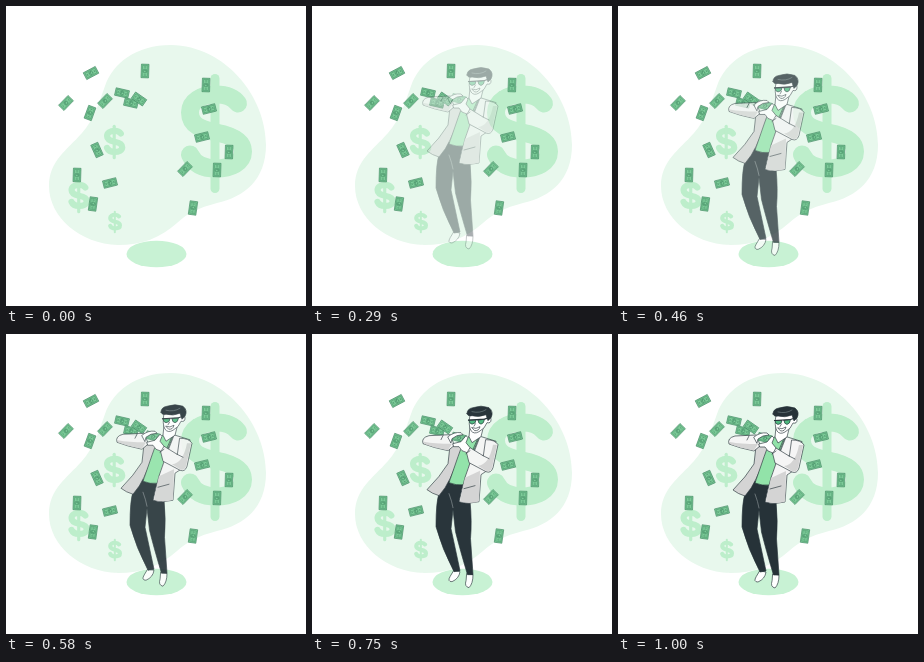
Recreate the animation shown at these times as an HTML page. Size 300 by 300 pixels, loop 1040 ms.

```html
<!DOCTYPE html>
<html lang="en">
<head>
<meta charset="utf-8">
<title>Money rain</title>
<style>
  html, body { margin: 0; width: 100%; height: 100%; overflow: hidden; background: #fff; }
  svg { display: block; width: 100vw; height: 100vh; }
  #signs { fill: none; stroke: #bdeecb; stroke-linecap: round; }
  #man { stroke: #263238; stroke-width: .65; stroke-linejoin: round; stroke-linecap: round; }
  .dark { fill: #263238; }
  .white { fill: #fff; }
  .light { fill: #f5f5f5; }
  .grey { fill: #d4d4d4; }
  .green { fill: #92e3a9; }
  .line { fill: none; }
  .shade { fill: #d4d4d4; stroke: none; }
</style>
</head>
<body>
<svg viewBox="0 0 300 300">
  <defs>
    <path id="curl" d="M22 -30C17 -37 9 -39 0 -39C-15 -39 -26 -32 -26 -21C-26 -8 -14 -4 0 -1C16 2 27 7 27 18C27 29 15 35 0 35C-13 35 -22 30 -26 21"/>
    <g id="bill" fill="#7ccb98" stroke="#3f8560" stroke-width=".6">
      <rect x="-6.8" y="-3.8" width="13.6" height="7.6"/>
      <rect x="-5.5" y="-2.6" width="11" height="5.200" stroke-width=".4"/>
      <circle r="1.900"/>
      <path fill="none" d="M.7 -.9Q-.9 -1.3 -.6 -.3T-.6 .9M-4 -1V1M4 -1V1"/>
    </g>
  </defs>

  <path fill="#e8f8ed" d="M99 80C107 57 130 39 165 39C220 40 260 91 260 139C260 174 238 191 211 197C192 202 182 207 171 217C154 232 136 239 112 239C74 238 43 211 43 180C43 155 61 144 76 127C88 113 93 97 99 80Z"/>
  <g id="signs"></g>
  <ellipse cx="150.5" cy="248" rx="30" ry="13.3" fill="#c8f2d4"/>
  <g id="bills"></g>

  <g id="man" opacity="0">
    <path class="white" d="M142 237L148 238Q147 245 140 248Q135 248 138 243Z"/>
    <path class="white" d="M155 240L161 241Q161 250 157 254Q152 253 154 247Z"/>
    <path class="dark" d="M136 147L153 149L158 167Q160 188 158.500 205L161 241L155.500 241Q148 216 143.500 198L141 176L139 195L148 237L142 238Q130 215 124 193Q124 168 127 160Z"/>
    <path class="line" stroke="#8b9598" d="M137 160Q140 168 141 174"/>
    <path class="grey" d="M138 112L136 130Q128 143 115 156Q120 160 127 162Q134 154 138 145L153 112Z"/>
    <path class="green" d="M152 107L159 101L167 104L161 119L152 151Q144 152 137 149L146 123Z"/>
    <path class="light" d="M168 103L161 121Q152 143 147 168Q157 171 167 168L169 141L178 135L184 108Z"/>
    <path class="shade" d="M153 144L168 137L167 167.500Q157 170.500 148 167.500Z"/>
    <path class="line" d="M152 155L163 152M167 102L160 118L164 121"/>

    <path class="white" d="M158 93L157 103L160 109L169 103L171 95Z"/>
    <path class="white" d="M158 81Q156 92 159 97Q162 101 167 98Q173 95 175 89Q179 90 179 86Q179 83 176 85L175 79Z"/>
    <path class="dark" d="M155 80Q155 75 161 74Q169 71 177 74Q182 78 179 84L176 87L174 81Q167 84 160 82Q156 83 155 80Z"/>
    <path class="line" stroke="#718084" d="M160 78Q168 80 174 76"/>
    <path fill="#4fb980" d="M157 86.500L164 86.500Q164 90 160 90.500Q157 90 157 86.500ZM166 86.500L172.500 85.500Q172 90 169 90.500Q166 90 166 86.500Z"/>
    <path class="line" stroke-width="1.200" d="M156.500 86.500L172.500 85.500L177 84"/>
    <path class="line" d="M163.500 90L162 92.500"/>
    <path class="white" d="M160 94Q164 96 168 93Q167 97.500 163 97Z"/>

    <path class="light" d="M174 106Q183 106 186 111L181 134Q179 140 174 138L157 129L154 117L158 114L171 122Z"/>
    <path class="shade" d="M185 111L180 134Q178 139 174 137L166 132Q177 131 181 111Z"/>
    <path class="line" d="M171 122L177 125M154 120L158 117"/>
    <path class="light" d="M138 101L117 102Q109 104 111 110Q121 114 136 117L142 112Z"/>
    <path class="shade" d="M112 108Q122 110 140 110L136 116.500Q121 113.500 112 110Z"/>
    <path class="line" d="M131 102L129 106"/>
    <use href="#bill" transform="translate(147 104) rotate(15)"/>
    <path class="white" d="M136 103Q142 98 149 99L151 101L145 102L140 105L139 109Z"/>
    <path class="white" d="M141 110L149 108L154 102L156 104L154 109L158 114L155 119Q149 118 147 113L142 113Z"/>
  </g>
</svg>
<script>
  const NS = "http://www.w3.org/2000/svg";
  const $ = id => document.getElementById(id);

  function add(parent, name, attrs) {
    const el = document.createElementNS(NS, name);
    for (const key in attrs) el.setAttribute(key, attrs[key]);
    parent.append(el);
    return el;
  }

  function addSign(x, y, scale, weight) {
    const g = add($("signs"), "g", {
      "stroke-width": weight, transform: `translate(${x} ${y}) scale(${scale})`
    });
    add(g, "use", { href: "#curl" });
    add(g, "path", { d: "M-1 -55V55", "stroke-width": weight / 2 });
  }
  addSign(210, 127.5, 1, 18);
  addSign(108.5, 136, .285, 22);
  addSign(73, 190, .285, 22);
  addSign(109, 216, .185, 22);

  function addBills(angle, ...spots) {
    for (const [x, y] of spots) add($("bills"), "use", {
      href: "#bill", transform: `translate(${x} ${y}) rotate(${angle})`
    });
  }
  addBills(92, [139, 65], [200, 79], [223, 146], [211, 164], [71, 169]);
  addBills(-82, [187, 202], [87, 198]);
  addBills(-14, [203, 103], [196, 131], [104, 177]);
  addBills(-46, [60, 97], [99, 95], [179, 163]);
  addBills(-28, [85, 67]);
  addBills(-70, [84, 107]);
  addBills(66, [91, 144]);
  addBills(13, [116, 87], [125, 97]);
  addBills(35, [133, 93]);

  const LOOP = 1040, FRAME = 1000 / 24, START = 42, PACE = 355, DROP = 18;

  // slow start, quick middle, long soft landing
  const ease = t => 1 - Math.exp(-((Math.max(0, t - START) / PACE) ** 2));

  function draw() {
    const t = performance.now() % LOOP;
    const p = ease(Math.floor((t + 4) / FRAME) * FRAME);
    $("man").setAttribute("opacity", p);
    $("man").setAttribute("transform", `translate(0 ${-DROP * (1 - p)})`);
    requestAnimationFrame(draw);
  }
  draw();
</script>
</body>
</html>
```
